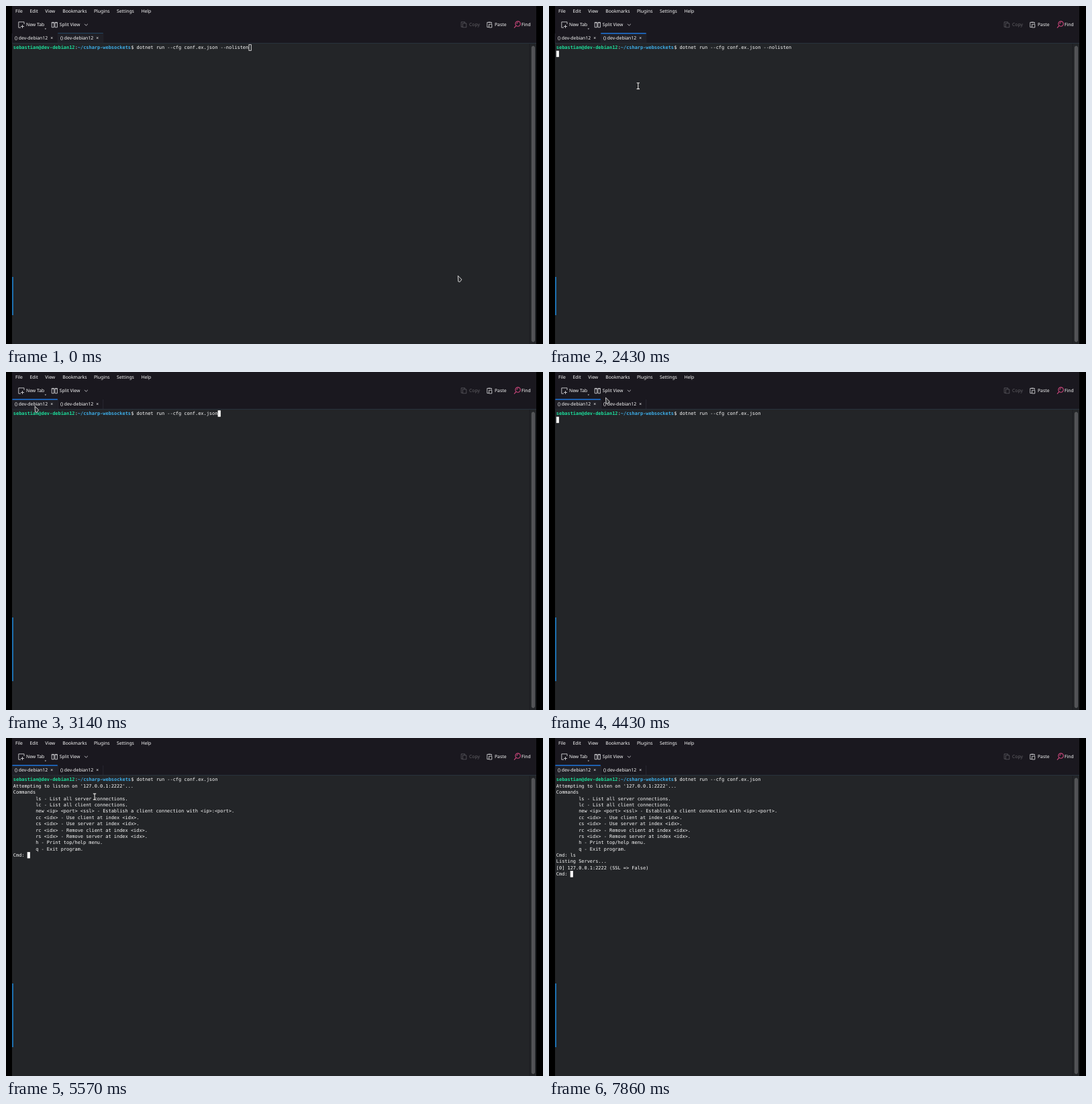
Write an HTML page that moves like this. It is 800 px wide and 504 px high and loops after 8 s.

```html
<!DOCTYPE html>
<html lang="en">
<head>
<meta charset="utf-8">
<title>Terminal session</title>
<style>
  html, body { margin: 0; width: 100%; height: 100%; overflow: hidden; background: #000; }
  svg { display: block; width: 800px; height: 504px; }
  text { white-space: pre; text-rendering: geometricPrecision; fill: #fcfcfc; }
  .ui text { font: 6.8px "Noto Sans", sans-serif; }
  .term text { font: 6.935px "DejaVu Sans Mono", monospace; }
  .term .user { fill: #1cdc9a; font-weight: bold; }
  .term .path { fill: #3daee9; font-weight: bold; }
  .icon { fill: none; stroke: #e4e4e6; stroke-width: .8; }
  .ui .dim { opacity: .32; }
</style>
</head>
<body>
<svg viewBox="0 0 800 504">
  <rect width="800" height="504" fill="#000"/>
  <rect x="9" width="781" height="56" fill="#1a181f"/>
  <rect x="9" y="55.5" width="781" height="448.5" fill="#232528"/>
  <rect x="9" y="55" width="781" height=".8" fill="#2b3844"/>

  <g class="ui">
    <g id="labels"></g>
    <g class="icon">
      <path d="M22 32.2h-3.2V23.8h8.2V27M24.5 28v5M22 30.5h5"/>
      <path d="M57.6 33.6h2.4l-1.2 1.3z" fill="#e4e4e6" stroke="none"/>
      <path d="M68.2 24.4h3.4v7.4h-3.4zM73 24.4h3.4v7.4H73zM68.2 25h3.4M73 25h3.4"/>
      <path d="M117 26.8l2.4 2.4 2.4-2.4"/>
      <path class="dim" d="M680 31.2h-1.8v-7.4h5.4v1.6M680.4 25.8h5.4v6h-5.4z"/>
      <path d="M719 31.6h-2.2v-7.2h6.6v2M718.6 24.2h3M719.6 27.2h4.2v4.8h-4.2z"/>
      <g stroke="#d0487f" stroke-width="1.1">
        <circle cx="762.6" cy="26.6" r="3.7"/>
        <path d="M760 29.4l-3 3.2M761 26.5a1.7 1.7 0 0 1 1.7-1.7"/>
      </g>
    </g>
    <path d="M77.3 41V55M144.7 41V55M9.3 41V55" stroke="#30303a" stroke-width=".7"/>
    <rect id="tabFill" y="40.5" width="67.4" height="14.8" fill="#202027"/>
    <rect id="tabLine" y="40" width="67.4"/>
    <g id="tabs"></g>
  </g>

  <rect x="779.6" y="56" width=".8" height="448" fill="#1b1b20"/>
  <rect x="783.3" y="60" width="4.2" height="440.6" rx="2.1" fill="#515255" stroke="#6c6d70" stroke-width=".6"/>
  <rect id="marker" x="9" width="2" fill="#1d70b0"/>

  <g class="term">
    <g id="rows"></g>
    <rect id="caret" height="8.6" stroke="#fcfcfc" stroke-width=".8"/>
  </g>

  <g id="mouse">
    <path id="arrow" d="M0 0L5.7 5.6L2.9 9.2L.5 8.6z" fill="#303134" stroke="#e2e2e2" stroke-width=".9" stroke-linejoin="round"/>
    <g id="beam" fill="none">
      <path d="M-2.2-4.4H2.2M0-4.4V4.4M-2.2 4.4H2.2" stroke="#111" stroke-width="2.2"/>
      <path d="M-2.2-4.4H2.2M0-4.4V4.4M-2.2 4.4H2.2" stroke="#f2f2f2" stroke-width="1.1"/>
    </g>
  </g>
</svg>

<script>
const LOOP = 8000, FRAMES = 56;
const LEFT = 10.8, CELL = 4.175, TOP = 57.5, ROW = 9.39;
const $ = id => document.getElementById(id);

function set(el, attrs) {
  for (const key in attrs) el.setAttribute(key, attrs[key]);
  return el;
}

function addText(parent, x, y, str, cls = "") {
  const el = document.createElementNS("http://www.w3.org/2000/svg", "text");
  el.textContent = str;
  parent.append(set(el, { x, y, class: cls }));
}

// Menu and toolbar
[[14, "File"], [35.5, "Edit"], [58.3, "View"], [84.3, "Bookmarks"], [131, "Plugins"],
 [165, "Settings"], [201.4, "Help"]].forEach(([x, s]) => addText($("labels"), x, 10.4, s));
[[30, "New Tab"], [79.8, "Split View"], [690, "Copy", "dim"], [728, "Paste"], [768, "Find"]]
  .forEach(([x, s, cls]) => addText($("labels"), x, 30.3, s, cls));
for (const x of [13, 81]) {
  addText($("tabs"), x, 50, "() dev-debian12");
  addText($("tabs"), x + 53.2, 50.1, "×");
}

// Terminal contents
const USER = "sebastian@dev-debian12", PATH = "~/csharp-websockets";
const RUN = "dotnet run --cfg conf.ex.json";
const HELP = [
  "Attempting to listen on '127.0.0.1:2222'...",
  "Commands",
  ...[
    "ls - List all server connections.",
    "lc - List all client connections.",
    "new <ip> <port> <ssl> - Establish a client connection with <ip>:<port>.",
    "cc <idx> - Use client at index <idx>.",
    "cs <idx> - Use server at index <idx>.",
    "rc <idx> - Remove client at index <idx>.",
    "rs <idx> - Remove server at index <idx>.",
    "h - Print top/help menu.",
    "q - Exit program."
  ].map(s => " ".repeat(8) + s)
];
const LISTING = ["Cmd: ls", "Listing Servers...", "[0] 127.0.0.1:2222 (SSL => False)", "Cmd: "];

// Each step: first frame, tab, command, lines below it
const STEPS = [
  [0, 1, RUN + " --nolisten", []],
  [10, 1, RUN + " --nolisten", [""]],
  [22, 0, RUN, []],
  [25, 0, RUN, [""]],
  [36, 0, RUN, [...HELP, "Cmd: "]],
  [45, 0, RUN, [...HELP, "Cmd: l"]],
  [48, 0, RUN, [...HELP, "Cmd: ls"]],
  [50, 0, RUN, [...HELP, ...LISTING]]
];
const FOCUS = 7;

// Pointer: frame, x, y, and whether it is shown until the next key
const MOVES = [
  [0, 673.3, 402.2, 1], [8, 230, 271, 1], [10, 230, 271, 0], [13, 152, 138, 1],
  [15, 146, 131, 1], [17, 132.8, 119.2, 1], [22, 43, 51, 1], [27, 44, 50, 1],
  [31, 84.5, 38.2, 1], [32, 86, 39.5, 1], [39, 132, 87.5, 1], [45, 132, 87.5, 0]
];

const lastFrom = (list, frame) => list.findLastIndex(item => item[0] <= frame);

function drawRows(command, lines) {
  const rows = $("rows");
  rows.replaceChildren();
  const put = (col, row, str, cls) =>
    addText(rows, LEFT + col * CELL, TOP + row * ROW + 6.9, str, cls);
  let col = 0;
  for (const [str, cls] of [[USER, "user"], [":", ""], [PATH, "path"], ["$ " + command, ""]]) {
    put(col, 0, str, cls);
    col += str.length;
  }
  lines.forEach((line, i) => {
    const body = line.trimStart();
    put(line.length - body.length, i + 1, body);
  });
  return lines.length ? lines.at(-1).length : col;
}

function drawMouse(frame) {
  const i = lastFrom(MOVES, frame), a = MOVES[i], b = MOVES[i + 1] || a;
  let p = b === a ? 0 : (frame - a[0]) / (b[0] - a[0]);
  if (b[0] - a[0] > 4) p = p * p * (3 - 2 * p);
  const x = a[1] + (b[1] - a[1]) * p, y = a[2] + (b[2] - a[2]) * p;
  const isArrow = frame < 1 || y < 57;
  set($("mouse"), { transform: `translate(${x} ${y})`, visibility: a[3] ? "visible" : "hidden" });
  $("arrow").style.display = isArrow ? "" : "none";
  $("beam").style.display = isArrow ? "none" : "";
}

function draw(frame) {
  const [, tab, command, lines] = STEPS[lastFrom(STEPS, frame)];
  const col = drawRows(command, lines), focused = frame >= FOCUS;
  set($("caret"), {
    x: LEFT + col * CELL + .4, y: TOP + lines.length * ROW + .2,
    width: CELL - .8, fill: focused ? "#fcfcfc" : "none"
  });
  const tabX = 9.4 + tab * 67.9;
  set($("tabFill"), { x: tabX });
  set($("tabLine"), { x: tabX, height: focused ? 1.6 : .9, fill: focused ? "#1d6fd0" : "#234b6b" });
  set($("marker"), tab ? { y: 404, height: 57 } : { y: 366, height: 95 });
  drawMouse(frame);
}

const startOf = k => Math.round(k * 100 / 7) * 10;

function frameAt(t) {
  let k = Math.min(FRAMES - 1, Math.ceil(t * FRAMES / LOOP));
  while (startOf(k) > t) k--;
  return k;
}

let shown = -1;
const start = performance.now();
function tick() {
  const frame = frameAt((performance.now() - start) % LOOP);
  if (frame !== shown) draw(shown = frame);
  requestAnimationFrame(tick);
}
tick();
</script>
</body>
</html>
```
